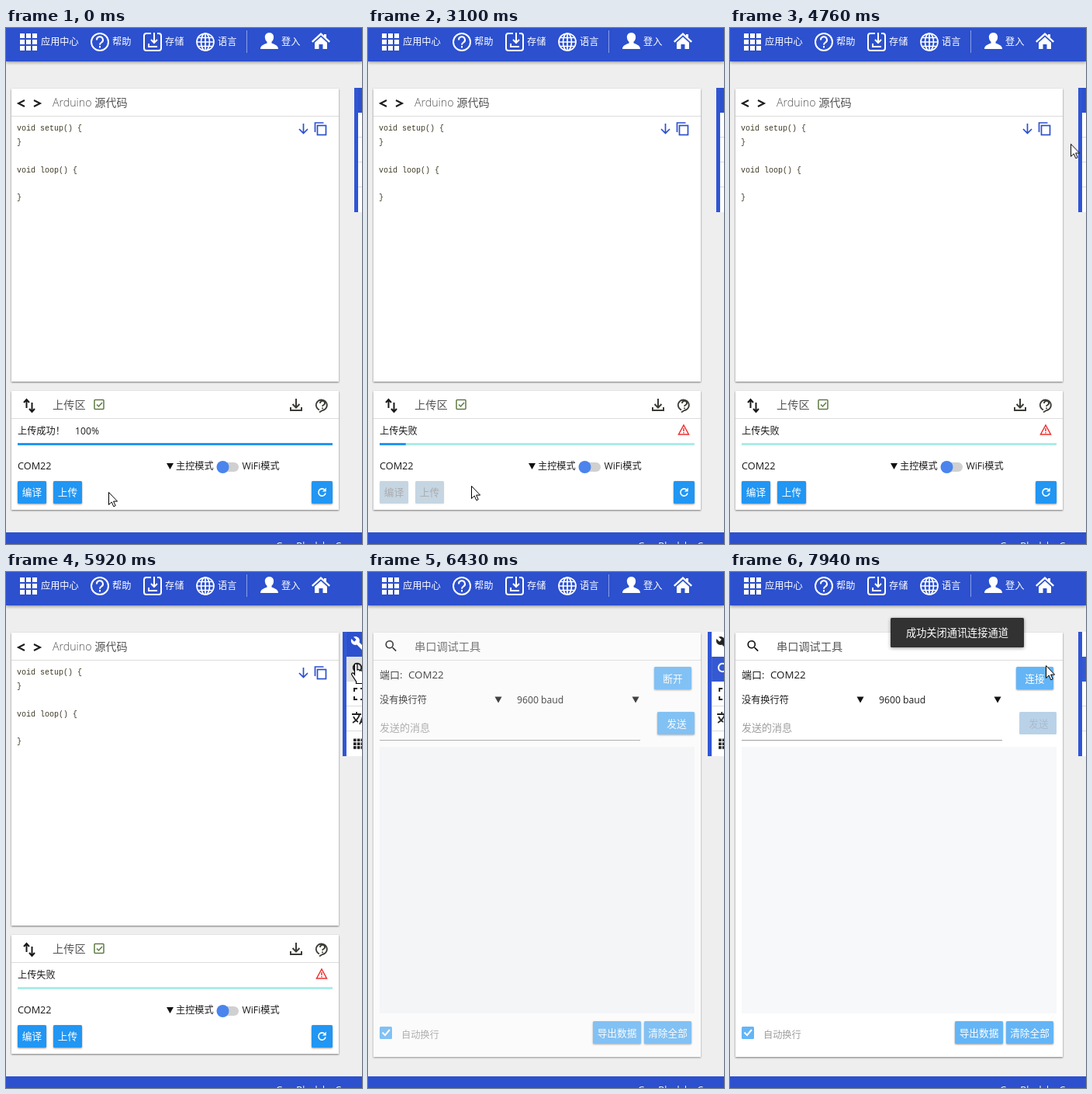
Animation, 459 px wide and 664 px high, one loop 7.99 s. Source, as an HTML page:

```html
<!DOCTYPE html>
<html lang="zh-CN">
<head>
<meta charset="utf-8">
<title>Arduino 源代码</title>
<style>
html, body { margin: 0; width: 100%; height: 100%; overflow: hidden; background: #eee; }
svg { display: block; }
text { font: 12.2px "Open Sans", "Noto Sans CJK SC", "Noto Sans CJK", sans-serif; fill: #1c1c1c; white-space: pre; }
.bar text, .btn text { fill: #fff; }
.bar text { font-weight: 500; }
.btn text { font-size: 12.7px; font-weight: 500; text-anchor: middle; }
.btn rect { fill: #2196f3; filter: drop-shadow(0 1px 1px rgba(0,0,0,.4)); }
.soft rect { fill: #64b5f6; }
.title { font-size: 14.2px; font-weight: 300; fill: #555; }
.code text { font: 10px "Liberation Mono", "DejaVu Sans Mono", monospace; fill: #3d3823; }
.card { fill: #fff; filter: drop-shadow(0 1px 1.2px rgba(0,0,0,.5)); }
.rule { fill: #dcdcdc; }
.line { fill: none; stroke: #fff; stroke-width: 2; }
#fill { transform-box: fill-box; transform-origin: left; }
</style>
</head>
<body>
<svg width="459" height="664" viewBox="0 0 459 664">
  <defs>
    <path id="dots" d="M0 0h6v6h-6zM8 0h6v6h-6zM16 0h6v6h-6zM0 8h6v6h-6zM8 8h6v6h-6zM16 8h6v6h-6zM0 16h6v6h-6zM8 16h6v6h-6zM16 16h6v6h-6z"/>
    <path id="wrench" d="M22.7 19l-9.1-9.1c.9-2.3.4-5-1.5-6.9-2-2-5-2.4-7.4-1.3L9 6 6 9 1.6 4.7C.4 7.1.9 10.1 2.9 12.1c1.900 1.900 4.600 2.400 6.900 1.500l9.100 9.100c.4.4 1 .4 1.400 0l2.300-2.300c.5-.4.5-1.100.1-1.400z"/>
    <path id="lens" fill-rule="evenodd" d="M15.500 14h-.8l-.3-.3A6.500 6.500 0 1 0 13.700 14.400l.3.3v.8l5 5 1.500-1.500zM9.500 14a4.500 4.500 0 1 1 0-9 4.500 4.500 0 0 1 0 9z"/>
    <path id="down" d="M0 0h9l-4.500 8z" fill="#111"/>
  </defs>
  <rect width="459" height="664" fill="#eee"/>

  <!-- top bar -->
  <g class="bar">
    <rect width="459" height="43" fill="#2c50ce" style="filter:drop-shadow(0 1px 2px rgba(0,0,0,.45))"/>
    <use href="#dots" x="18" y="7" fill="#fff"/>
    <text x="45" y="22">应用中心</text>
    <circle class="line" cx="121" cy="18" r="11"/>
    <path class="line" stroke-width="2.300" d="M117 15.500a4 4 0 1 1 6 3.200q-2 1.200-2 3M121 23v2.400"/>
    <text x="137" y="22">帮助</text>
    <path class="line" d="M187 7h-6q-3 0-3 3v16q0 3 3 3h16q3 0 3-3V10q0-3-3-3h-2M191 6v13M187 15l4 4 4-4M184 20v4h11"/>
    <text x="205" y="22">存储</text>
    <g class="line" style="stroke-width:1.700">
      <circle cx="257" cy="18" r="11"/><ellipse cx="257" cy="18" rx="5.500" ry="11"/>
      <path d="M257 7v22M246 18h22M248 12.500h18M248 23.500h18"/>
    </g>
    <text x="273" y="22">语言</text>
    <rect x="310" y="3" width="1" height="29" fill="#8aa0e6"/>
    <path fill="#fff" d="M339.500 6c4 0 6 3 5.600 6.500-.3 2.600-1.300 4-2.600 5.300v1.600c3 1.600 8.500 2.300 8.500 7.600h-23c0-5.300 5.500-6 8.500-7.600v-1.600c-1.300-1.300-2.300-2.700-2.600-5.300C333.500 9 335.500 6 339.500 6z"/>
    <text x="355" y="22">登入</text>
    <path fill="#fff" d="M406 6l4 3.700V8h3v4.500l5 4.600-1.500 1.700L406 9.300l-10.500 9.500-1.500-1.700zM406 11.500l8 7.200V27h-5.500v-6h-5v6H398v-8.300z"/>
  </g>

  <!-- code and upload page -->
  <g id="upload">
    <rect class="card" x="7" y="78" width="422" height="377"/>
    <rect class="rule" x="7" y="113" width="422" height="1"/>
    <path d="M24 93l-8 4 8 4M36 93l8 4-8 4" fill="none" stroke="#1a1a1a" stroke-width="2"/>
    <text class="title" x="60" y="101">Arduino 源代码</text>
    <g class="code">
      <text x="14" y="132">void setup() {</text><text x="14" y="150">}</text>
      <text x="14" y="186">void loop() {</text><text x="14" y="221">}</text>
    </g>
    <g fill="none" stroke="#2c50ce" stroke-width="1.700">
      <path d="M383.500 123v12M378 130l5.500 5.500 5.500-5.500M398.500 134v-12h11"/>
      <rect x="401.500" y="125.500" width="11" height="12"/>
    </g>

    <rect class="card" x="7" y="467" width="422" height="153"/>
    <rect class="rule" x="7" y="502" width="422" height="1"/>
    <path d="M26.500 489v-10M23 482l3.500-4 3.500 4M33.500 482v11M30 490l3.500 4 3.500-4" fill="none" stroke="#1a1a1a" stroke-width="2"/>
    <text class="title" x="60" y="490">上传区</text>
    <g fill="none" stroke="#5f7a45" stroke-width="1.500">
      <rect x="114" y="478.500" width="12" height="12" rx="1"/><path d="M117 484.500l2.500 2.500 4.500-5"/>
    </g>
    <g fill="none" stroke="#3c3c36" stroke-width="2">
      <path d="M374 477v11M369.500 484l4.500 4.500 4.500-4.500M367 488v4h14v-4"/>
      <path d="M404 491.500a7 6.800 0 1 1 4 .5l-4 2.500M405 483a3 2.700 0 1 1 4.500 2q-1.500.8-1.500 2M408 488.500v1.500" stroke-width="1.800"/>
    </g>
    <g id="done"><text x="15" y="523">上传成功！</text><text x="89" y="523">100%</text></g>
    <text id="busy" x="15" y="523">编译中...</text>
    <g id="fail">
      <text x="15" y="523">上传失败</text>
      <path d="M407 511l6.500 12h-13zM407 515v4M407 520v1.500" fill="none" stroke="#f03030" stroke-width="1.500"/>
    </g>
    <rect x="15" y="534" width="406" height="3" fill="#acece6"/>
    <rect id="fill" x="15" y="534" width="406" height="3" fill="#2196f3"/>
    <text x="15" y="568" style="font-size:12.700px">COM22</text>
    <use href="#down" x="207" y="560"/>
    <text x="219" y="568">主控模式</text>
    <rect x="273" y="559" width="27" height="12" rx="6" fill="#d0d0d0"/>
    <circle cx="279.500" cy="565" r="8" fill="#4a84ec"/>
    <text x="304.500" y="568">WiFi模式</text>
    <g class="btn">
      <rect class="act" x="15" y="583" width="37" height="29" rx="1.500"/><text class="lab" x="33.500" y="602">编译</text>
      <rect class="act" x="61" y="583" width="37" height="29" rx="1.500"/><text class="lab" x="79.500" y="602">上传</text>
      <rect x="394" y="583" width="27" height="29" rx="1.500"/>
    </g>
    <path d="M411 594.500a4.600 4.600 0 1 0 1 4" fill="none" stroke="#fff" stroke-width="1.600"/>
    <path d="M412.800 591.500v5h-5z" fill="#fff"/>
  </g>

  <!-- serial page -->
  <g id="serial">
    <rect class="card" x="7" y="78" width="422" height="546"/>
    <rect class="rule" x="7" y="113" width="422" height="1"/>
    <use href="#lens" transform="translate(20 85.500) scale(.82)" fill="#111"/>
    <text class="title" x="60" y="101">串口调试工具</text>
    <text x="15" y="137" style="font-size:13px">端口:</text>
    <text x="52" y="137" style="font-size:13.300px">COM22</text>
    <text x="15" y="169">没有换行符</text><use href="#down" x="163.500" y="160.500"/>
    <text x="192" y="169">9600 baud</text><use href="#down" x="340.500" y="160.500"/>
    <text x="15" y="205" style="font-size:13px;fill:#9e9e9e">发送的消息</text>
    <rect x="15" y="216" width="336" height="1" fill="#9e9e9e"/>
    <rect x="15" y="225" width="406" height="343" fill="#f7f8fa"/>
    <rect x="15" y="585" width="16" height="16" rx="1.500" fill="#64b5f6"/>
    <path d="M18.500 592.500l3.500 3.500 6-7" fill="none" stroke="#fff" stroke-width="2"/>
    <text x="43" y="600" style="fill:#9e9e9e">自动换行</text>
    <g class="btn soft">
      <rect x="369" y="122" width="48" height="29" rx="1.500"/>
      <text id="close" x="393" y="142">断开</text><text id="open" x="393" y="142">连接</text>
      <rect id="send" x="373" y="180" width="48" height="29" rx="1.500"/><text id="sendText" x="398" y="200">发送</text>
      <rect x="290" y="578" width="62" height="29" rx="1.500"/><text x="321" y="598">导出数据</text>
      <rect x="356" y="578" width="61" height="29" rx="1.500"/><text x="386.500" y="598">清除全部</text>
    </g>
  </g>

  <!-- side panel -->
  <g id="panel">
    <rect y="77" width="60" height="160" fill="#2f55d4"/>
    <rect x="5" y="77" width="55" height="160" fill="#fff"/>
    <rect id="hover" x="5" y="109" width="55" height="32" fill="#e0e0e0"/>
    <path d="M5 140.500h55M5 172.500h55M5 204.500h55" stroke="#dcdcdc"/>
    <rect id="tab0" x="5" y="77" width="55" height="32" fill="#2c50ce"/>
    <rect id="tab1" x="5" y="109" width="55" height="32" fill="#3459d2"/>
    <use id="icon0" href="#wrench" transform="translate(10 82) scale(.85)"/>
    <use id="icon1" href="#lens" transform="translate(10 114) scale(.95)"/>
    <path d="M15 154v-4h4M23 150h4v4M27 160v4h-4M19 164h-4v-4" fill="none" stroke="#222" stroke-width="2"/>
    <path d="M12 183h12M18 180v3M22 183q-2 7-9 11M14 186q2 5 6 7M22 196l4-10 4 10M23.500 193h5" fill="none" stroke="#222" stroke-width="1.800"/>
    <use href="#dots" transform="translate(14 214.500) scale(.6)" fill="#222"/>
  </g>

  <!-- footer -->
  <rect y="649" width="459" height="15" fill="#2c50ce"/>
  <text x="348" y="671" style="fill:#fff">Gen Block by C</text>

  <g id="toast">
    <rect x="207" y="59" width="172" height="38" rx="1.500" fill="#323232" style="filter:drop-shadow(0 1px 2px rgba(0,0,0,.4))"/>
    <text x="227" y="83" style="font-size:13.200px;fill:#fff">成功关闭通讯连接通道</text>
  </g>

  <g id="pointer">
    <path id="arrow" d="M.5.5v16l3.700-3.500 2.600 5.800 2.400-1.100-2.600-5.600h5z" fill="#fff" stroke="#000"/>
    <path id="hand" d="M-1.500 11V1.500a1.700 1.700 0 0 1 3.400 0V8q3-1 3.200 1 3-1 3.200 1 2.700-.6 2.700 1.500v6q0 2.500-2 4.500v3.500H.5V23l-5.500-8.500q-1-2 .5-2.500t3 2z" fill="#fff" stroke="#000" stroke-width="1.200"/>
  </g>
</svg>
<script>
const LOOP = 7990;
const HOLD = "steps(1, end)";

// steps: [time, value, easing to the next step]
function play(sel, prop, steps) {
  const last = steps[steps.length - 1];
  const frames = [...steps, [LOOP, last[1]]].map(([t, value, easing = "linear"]) =>
    ({ offset: t / LOOP, [prop]: value, easing }));
  for (const el of document.querySelectorAll(sel))
    el.animate(frames, { duration: LOOP, iterations: Infinity });
}

function show(sel, from, to = LOOP) {
  const steps = from ? [[0, 0, HOLD], [from, 1, HOLD]] : [[0, 1, HOLD]];
  if (to < LOOP) steps.push([to, 0, HOLD]);
  play(sel, "opacity", steps);
}

const move = (x, y = 0) => `translate(${x}px, ${y}px)`;
const EASE = "ease-in-out";

play("#pointer", "transform", [
  [0, 132, 597], [330, 132, 597, EASE], [690, 91, 596], [1710, 91, 596, EASE],
  [1850, 97, 593], [2000, 97, 593, EASE], [2310, 132, 588], [2560, 132, 588],
  [2590, 133, 589], [3740, 133, 589, EASE], [4530, 427, 187], [4580, 428, 184],
  [4760, 439, 149, "ease-out"], [4990, 445, 122], [5170, 445, 122], [5450, 451, 118],
  [6240, 451, 118, "ease-in"], [6420, 475, 122], [6750, 475, 140, EASE],
  [7200, 407, 120]
].map(([t, x, y, ease]) => [t, move(x, y), ease]));
play("#hand", "opacity", [[0, 0, HOLD], [5450, 1, HOLD], [6430, 0, HOLD]]);
play("#arrow", "opacity", [[0, 1, HOLD], [5450, 0, HOLD], [6430, 1, HOLD]]);

// compile, then a failed upload
show("#done", 0, 1070);
show("#busy", 1070, 3050);
show("#fail", 3050);
play("#fill", "transform", [
  [0, 1], [1070, 1, "ease-out"], [1400, 0], [2770, 0, "ease-out"],
  [3000, .1], [3050, .1], [3350, 0]
].map(([t, part, ease]) => [t, `scaleX(${part})`, ease]));

const toggle = (on, off) => [[0, on], [1070, on], [1370, off], [3060, off], [3360, on]];
play(".act", "fill", toggle("#2196f3", "#dfdfdf"));
play(".lab", "fill", toggle("#fff", "#9f9f9f"));
play(".act", "filter", toggle("drop-shadow(0 1px 1px rgba(0,0,0,.4))", "drop-shadow(0 1px 1px rgba(0,0,0,0))"));

// side panel and page switch
play("#panel", "transform", [
  [0, 449], [5630, 449], [5920, 434], [6120, 424], [6310, 424], [6430, 438], [6540, 449]
].map(([t, x]) => [t, move(x)]));
show("#hover", 5500, 6150);
show("#tab0", 0, 6150);
show("#tab1", 6150);
play("#icon0", "fill", [[0, "#fff", HOLD], [6150, "#222", HOLD]]);
play("#icon1", "fill", [[0, "#222", HOLD], [6150, "#fff", HOLD]]);
play("#upload", "opacity", [[0, 1], [6050, 1], [6170, 0]]);
play("#serial", "opacity", [[0, 0], [6170, 0], [6430, .78], [6510, 1]]);

// disconnect
show("#close", 0, 7640);
show("#open", 7640);
play("#send", "fill", [[0, "#64b5f6"], [7720, "#64b5f6"], [7940, "#b9d2e8"]]);
play("#send", "filter", [
  [0, "drop-shadow(0 1px 1px rgba(0,0,0,.4))"], [7720, "drop-shadow(0 1px 1px rgba(0,0,0,.4))"],
  [7900, "drop-shadow(0 1px 1px rgba(0,0,0,0))"]
]);
play("#sendText", "fill", [[0, "#fff"], [7720, "#fff"], [7940, "#a9bccb"]]);
play("#toast", "opacity", [[0, 0], [7620, 0, "ease-out"], [7900, 1]]);
play("#toast", "transform", [[0, move(0, 35)], [7620, move(0, 35), "ease-out"], [7900, move(0)]]);
</script>
</body>
</html>
```
